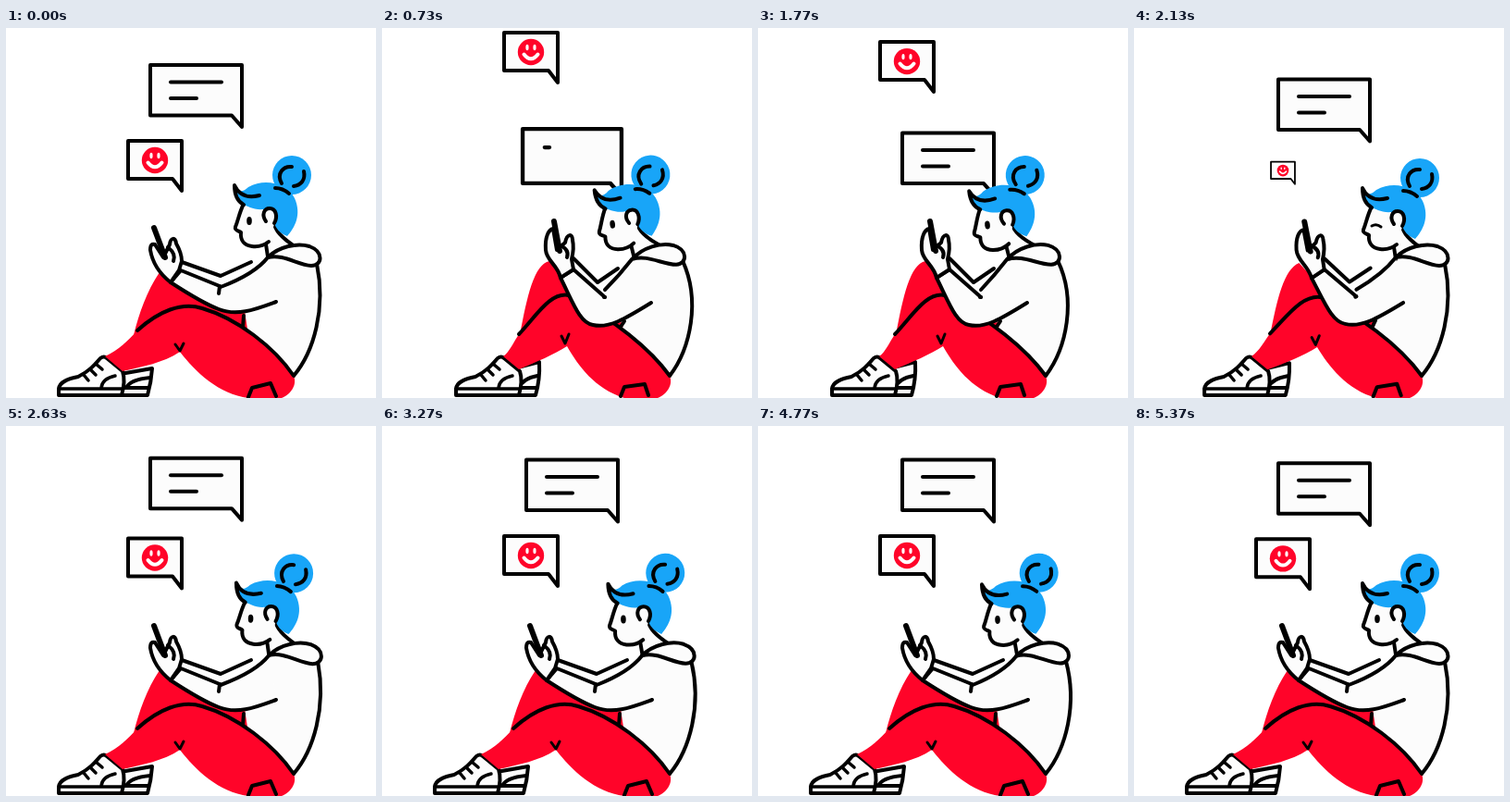
An HTML page with a canvas that plays this animation: 400 px wide and 400 px high, repeating every 5.41 s.

```html
<!DOCTYPE html>
<html lang="en">
<head>
<meta charset="utf-8">
<title>Chatting</title>
<style>
html, body { margin: 0; width: 100%; height: 100%; overflow: hidden; background: #fff; }
canvas { display: block; width: 400px; height: 400px; }
</style>
</head>
<body>
<canvas id="stage"></canvas>
<script>
const LOOP = 5410;
const RED = '#ff0429', BLUE = '#18a5f8', WHITE = '#fcfcfc', INK = '#000';
const canvas = document.getElementById('stage');
const ctx = canvas.getContext('2d');
const dpr = window.devicePixelRatio || 1;
canvas.width = canvas.height = 400 * dpr;

// Eased value through [time, value] keys
function track(keys, t) {
  if (t <= keys[0][0]) return keys[0][1];
  for (let i = 1; i < keys.length; i++) {
    const [t0, a] = keys[i - 1], [t1, b] = keys[i];
    if (t < t1) return a + (b - a) * (0.5 - 0.5 * Math.cos(Math.PI * (t - t0) / (t1 - t0)));
  }
  return keys[keys.length - 1][1];
}

// Blend two paths of equal structure
function mix(a, b, k) {
  const num = /-?[\d.]+/g, to = b.match(num);
  let i = 0;
  return a.replace(num, v => (+v + (to[i++] - v) * k).toFixed(2));
}

function fill(d, color) {
  ctx.fillStyle = color;
  ctx.fill(new Path2D(d));
}

function line(d, width = 4, color = INK) {
  ctx.strokeStyle = color;
  ctx.lineWidth = width;
  ctx.stroke(new Path2D(d));
}

function shape(d, color = WHITE, width = 4) {
  fill(d, color);
  line(d, width);
}

function oval(x, y, rx, ry, color) {
  ctx.fillStyle = color;
  ctx.beginPath();
  ctx.ellipse(x, y, rx, ry, 0, 0, 7);
  ctx.fill();
}

function group(draw) {
  ctx.save();
  draw();
  ctx.restore();
}

// Scale about a bubble's bottom edge, shifted by dy
function bubble(x, y, dy, scale, draw) {
  if (scale < 0.01) return;
  group(() => {
    ctx.translate(x, y + dy);
    ctx.scale(scale, scale);
    ctx.translate(-x, -y);
    draw();
  });
}

const bob = (t, peak) => 2 * Math.cos(2 * Math.PI * (t - peak) / 1500);

function bubbles(t) {
  const rise = track([[60, 0], [730, -117], [1170, -100]], t);
  const settled = track([[2400, 0], [2900, 1]], t);
  const bigY = t < 500 ? rise
    : track([[730, 73.5], [900, 75], [1715, 75], [2390, -13], [2800, -1.7]], t) + bob(t, 3900) * settled;
  const bigScale = t < 500 ? track([[60, 1], [340, 0]], t)
    : track([[540, 0], [720, 1.08], [900, 1]], t);
  const draw1 = t < 500 ? 1 : track([[685, 0], [920, 1]], t);
  const draw2 = t < 500 ? 1 : track([[850, 0], [1080, 1]], t);
  bubble(205.5, 95, bigY, bigScale, () => {
    shape('M156 40H255V107L244 94.5H156Z');
    if (draw1 > 0) line(`M178 58.5h${(55 * draw1).toFixed(2)}`);
    if (draw2 > 0) line(`M178 76h${(28 * draw2).toFixed(2)}`);
  });

  const smallY = t < 2080
    ? rise + track([[1700, 0], [2080, -85]], t)
    : (bob(t, 3830) - 1.6) * settled;
  const smallScale = t < 2080 ? 1 : track([[2082, 0], [2185, 1], [2270, 1.08], [2420, 1]], t);
  bubble(161, 163, smallY, smallScale, () => {
    shape('M132 122H190V176L180 163H132Z');
    oval(161, 143, 14.2, 14.2, RED);
    oval(157, 138, 1.6, 3.2, '#fff');
    oval(165, 138, 1.6, 3.2, '#fff');
    line('M153.5 145.5Q161 155 168.5 145.5', 4, '#fff');
  });
}

function shoes(p) {
  shape(mix('M118 397V375L158 368Q157 383 153 397Z', 'M135 397V370L170 361Q171 380 166 397Z', p));
  line(mix('M125 389L154 389M130 389Q134 380 156 378', 'M146 389L167 389M148 389Q152 379 168 376', p));
  group(() => {
    ctx.translate(23 * p, 0);
    shape('M57 397V390C58 382 68 379 78 377C90 371 96 364 102 357Q106 354 109 357L126 371C129 380 127 390 125 397Z');
    line('M57 390H125M103 389Q104 379 118 376', 3.5);
    line('M84 375L89 381M91 369L97 375M97 363L104 369', 3.5);
  });
}

function head(blink) {
  fill('M280 232L283 250L313 240C303 230 292 224 290 212Z', WHITE);
  line('M281 234L283 247M290 211Q291 222 312 236');
  const face = 'M257 190C252 200 251 208 248 215C247 219 251 219 254 221C253 230 258 235 266 236C274 237 279 235 284 231';
  fill(face + 'L290 212L285 190Z', WHITE);
  line(face);
  oval(309, 159, 21, 21, BLUE);
  fill('M247 170C250 178 256 178 262 172C280 162 304 168 312 184C320 202 312 216 304 225C296 222 291 216 290 210L279 206L278 196C268 197 260 192 257 191C249 185 246 178 247 170Z', BLUE);
  line('M257 191C249 187 247 179 247 170C252 181 262 184 274 181');
  line('M298 168C292 157 300 149 309 150M322 155C324 164 319 170 311 171M291 173Q299 173 306 179');
  shape('M281 209C276 202 279 195 285 195C292 195 294 204 290 211');
  if (blink) line('M257 211Q262 208 267 212', 3);
  else oval(263, 208.5, 2.8, 4.5, INK);
}

function hood() {
  shape('M283 248C295 236 315 232 328 236C344 242 342 257 330 257C315 256 300 244 283 248Z');
}

function turned(angle, x, y, draw) {
  group(() => {
    ctx.translate(x, y);
    ctx.rotate(angle);
    ctx.translate(-x, -y);
    draw();
  });
}

function person({ legs, arms, lean, dip, blink }) {
  const leg = (a, b) => mix(a, b, legs);
  const arm = (a, b) => mix(a, b, arms);
  shoes(legs);

  // Torso
  const back = mix('M311 376C333 350 346 303 336 255', 'M311 376C334 345 344 292 322 251', lean);
  const neckX = 283 - 16 * lean, neckY = 248 + 2 * lean;
  fill(`${back}L${neckX} ${neckY}L${232 + 9 * arms} 281L240 312Z`, WHITE);
  line(back);
  turned(-0.12 * lean, 295, 358, () => {
    ctx.translate(0, dip);
    head(blink);
  });
  turned(-0.083 * lean, 305, 440, hood);

  // Legs
  fill(leg(
    'M166 264C152 285 144 308 138 332L185 310L262 332L258 306L235 304L180 276Z',
    'M181 252C164 256 157 290 149 332L195 300L258 330L262 318L230 320L195 268Z'), RED);
  line(leg('M257 311L256 324', 'M262 317L258 323'));
  fill(leg(
    'M107 355C122 348 132 338 142 327C165 306 190 296 212 303C250 314 290 345 311 376C315 386 308 396 298 400L262 400C230 396 205 372 188 350C170 362 148 366 126 371Z',
    'M131 355C138 350 142 340 148 331C167 311 182 285 202 289C240 310 285 340 311 376C315 386 308 396 298 400L262 400C230 390 212 365 200 344C188 352 165 362 148 369Z'), RED);
  line(leg(
    'M142 327C165 306 190 296 212 303C250 314 290 345 311 376',
    'M148 331C167 311 182 285 202 289C240 310 285 340 311 376'));
  line(leg('M183 342L188 349L192 341', 'M194 333L198 341L202 331'), 3);
  line(leg('M262 399L266 389L286 384L292 398', 'M258 398L262 388L284 385L288 397'));

  // Arms
  const farArm = arm('M190 253L232 268L265 253', 'M207 249L233 275L255 260');
  fill(farArm + arm('L231 279L189 262Z', 'L241 291L207 261Z'), WHITE);
  line(farArm);
  const sleeve = arm(
    'M292 296C270 304 250 312 230 304C214 298 198 288 178 275L189 262L231 279',
    'M291 297C262 315 245 325 228 321C214 319 207 298 193 270L207 261L241 291');
  fill(`${sleeve}L${neckX} ${neckY}Z`, WHITE);
  line(sleeve);
  line(arm('M231 279L230 287', 'M241 291L240 291'));
  line(`M${neckX} ${neckY}Q${neckX - 14} ${neckY + 18} ${232 + 9 * arms} ${280 + 3 * arms}`);

  // Hands and phone
  shape(arm(
    'M178 275C164 264 158 252 156 240C156 234 158 233 161 234L170 248L177 234C178 226 183 226 184 233C188 240 190 248 190 252L187 262Z',
    'M193 270C190 256 178 252 177 240C176 226 180 218 185 217L189 240L198 232C200 222 206 222 206 229C208 238 206 246 205 250L207 261Z'));
  line(arm('M160 216L172 248', 'M186 209L192 241'), 6);
  line(arm('M175 237Q184 244 181 252', 'M193 235Q203 240 200 248'));
}

// 0: legs stretched, phone held low; 1: knees drawn up, phone raised
const curl = t => track([[240, 0], [700, 1], [2025, 1], [2415, 0]], t);

function render(t) {
  ctx.setTransform(dpr, 0, 0, dpr, 0, 0);
  ctx.fillStyle = '#fff';
  ctx.fillRect(0, 0, 400, 400);
  ctx.lineCap = ctx.lineJoin = 'round';
  bubbles(t);
  person({
    legs: curl(t),
    arms: curl(t - 40),
    lean: track([[200, 0], [970, 1], [1650, 1], [2120, 0], [2450, -0.1], [4250, 0.4], [5370, 0]], t),
    dip: track([[1650, 0], [2130, 3], [2450, 0]], t),
    blink: t > 2060 && t < 2210
  });
}

let start;
function frame(now) {
  start ??= now;
  render((now - start) % LOOP);
  requestAnimationFrame(frame);
}
requestAnimationFrame(frame);
</script>
</body>
</html>
```
